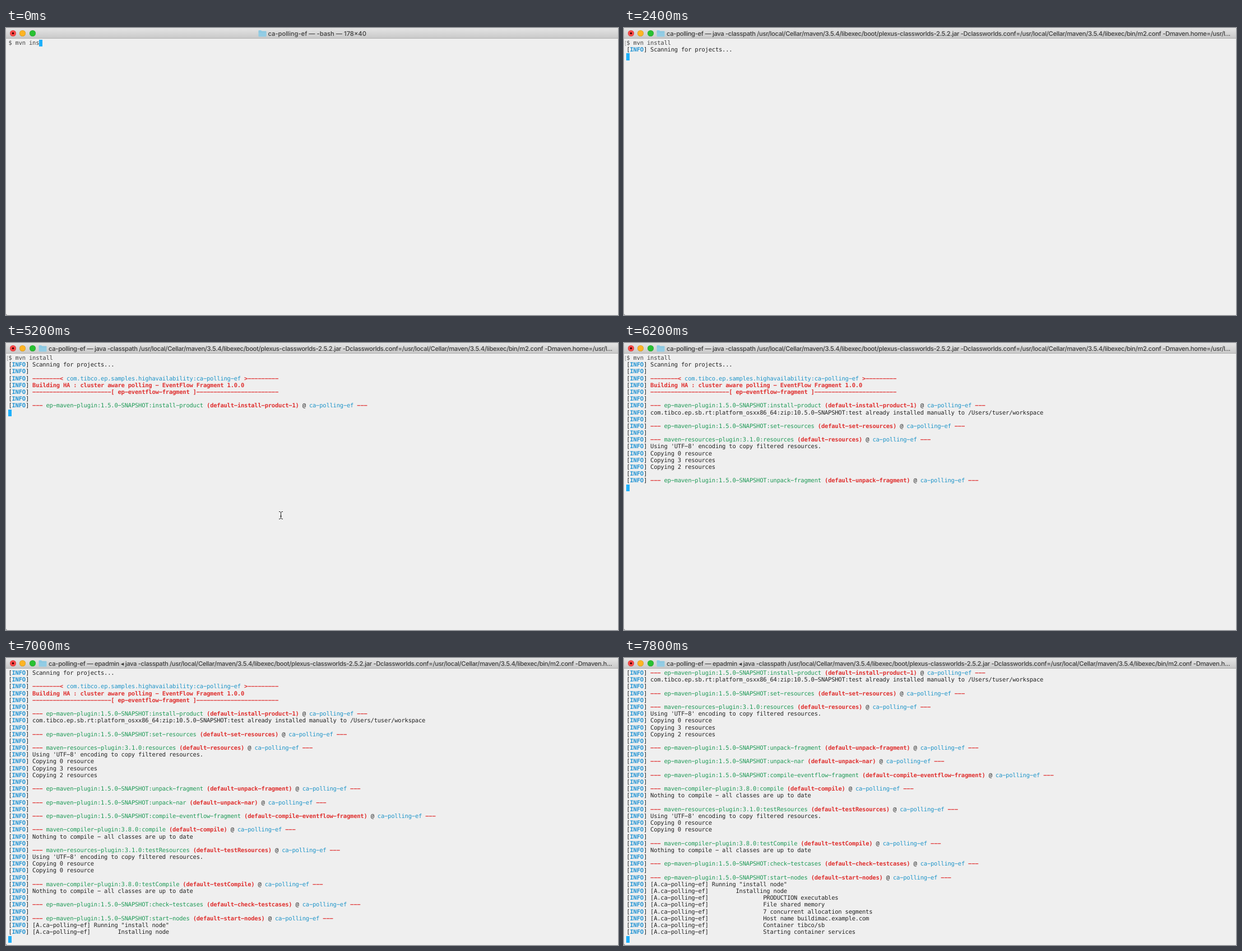
Animation, 1092 px wide and 513 px high, one loop 8000 ms. Source, as an HTML page:

```html
<!DOCTYPE html>
<html lang="en">
<head>
<meta charset="utf-8">
<title>Terminal</title>
<style>
  html, body { margin: 0; width: 100%; height: 100%; overflow: hidden; background: #777; }
  #window { position: relative; width: 1092px; height: 513px; overflow: hidden;
    background: #efefef; border-bottom-left-radius: 3px; text-rendering: geometricPrecision; }
  #bar { position: absolute; inset: 0 0 auto; height: 18px; border-bottom: 1px solid #b1b1b1;
    background: linear-gradient(#e4e4e4, #c9c9c9); }
  .light { position: absolute; top: 4px; width: 11px; height: 11px; border-radius: 50%;
    box-shadow: inset 0 0 0 .5px #0003; }
  #close { left: 6.5px; background: radial-gradient(circle, #4d0000 1.6px, #fc4948 2.2px); }
  #shrink { left: 24px; background: #fdb424; }
  #zoom { left: 41.5px; background: #28c132; }
  #title { position: absolute; top: 0; height: 19px; display: flex; align-items: center;
    white-space: pre; color: #3c3c3c; font: 500 11.2px Inter, sans-serif; }
  #title.tight { letter-spacing: -.32px; }
  #title svg { margin-right: 3px; }
  #screen { position: absolute; left: 4.4px; top: 21px; height: 488px; margin: 0; color: #222;
    font: 10.46px/12.2px "DejaVu Sans Mono", monospace; letter-spacing: calc(6.1px - .60205em); }
  #screen div { position: relative; height: 12.2px; }
  .command { color: #444; }
  .mark { position: absolute; left: -2.9px; top: 2px; width: 2px; height: 9px;
    border: solid #aaa; border-width: 1px 0 1px 1px; box-sizing: border-box; }
  .info { color: #2093d3; font-weight: bold; }
  .red { color: #df302f; font-weight: bold; }
  .green { color: #1f9a57; }
  .cyan { color: #1f95c9; }
  #cursor { position: absolute; width: 6.1px; height: 12.2px; background: #1db0fb; }
  #pointer { position: absolute; }
</style>
</head>
<body>
<div id="window">
  <div id="bar">
    <i class="light" id="close"></i><i class="light" id="shrink"></i><i class="light" id="zoom"></i>
    <div id="title"><svg width="15" height="13"><path d="M.5 2q0-1 1-1h3.5l1.5 1.5h7q1 0 1 1v8q0 1-1 1h-12q-1 0-1-1z" fill="#92cce4"/><path d="M.5 4h14" stroke="#7dbdd9" stroke-width=".7"/></svg><span id="titleText"></span></div>
  </div>
  <pre id="screen"></pre>
  <div id="cursor"></div>
  <svg id="pointer" width="7" height="14"><path d="M0 .5h2l1.5 1.5 1.5-1.5h2M3.5 2v10M0 13.5h2l1.5-1.5 1.5 1.5h2M2 8.5h3" fill="none" stroke="#222"/></svg>
</div>
<script>
const $ = id => document.getElementById(id);
const span = (type, text) => `<span class="${type}">${text}</span>`;
const red = text => span('red', text);
const cyan = text => span('cyan', text);
const info = (text = '') => `[${span('info', 'INFO')}] ${text}`;
const dashes = n => '-'.repeat(n);

// A blank line followed by the heading of a plugin goal
const goal = (plugin, name, id = name) => [info(), info(
  `${red('---')} ${span('green', `${plugin}:${name}`)} ${red(`(default-${id})`)} @ ${cyan('ca-polling-ef')} ${red('---')}`)];
const ep = (name, id) => goal('ep-maven-plugin:1.5.0-SNAPSHOT', name, id);
const resources = (name, ...counts) => [
  ...goal('maven-resources-plugin:3.1.0', name),
  info("Using 'UTF-8' encoding to copy filtered resources."),
  ...counts.map(n => info(`Copying ${n} resource${n ? 's' : ''}`))];
const compiler = name => [
  ...goal('maven-compiler-plugin:3.8.0', name),
  info('Nothing to compile - all classes are up to date')];
const node = (indent, text) => info('[A.ca-polling-ef] ' + ' '.repeat(indent) + text);

const command = '$ mvn install';
const lines = [
  span('mark', '') + span('command', command),
  info('Scanning for projects...'),
  info(),
  info(`${red(dashes(8) + '&lt;')} ${cyan('com.tibco.ep.samples.highavailability:ca-polling-ef')} ${red('&gt;' + dashes(9))}`),
  info(red('Building HA : cluster aware polling - EventFlow Fragment 1.0.0')),
  info(red(`${dashes(23)}[ ep-eventflow-fragment ]${dashes(24)}`)),
  ...ep('install-product', 'install-product-1'),
  info('com.tibco.ep.sb.rt:platform_osxx86_64:zip:10.5.0-SNAPSHOT:test already installed manually to /Users/tuser/workspace'),
  ...ep('set-resources'),
  ...resources('resources', 0, 3, 2),
  ...ep('unpack-fragment'),
  ...ep('unpack-nar'),
  ...ep('compile-eventflow-fragment'),
  ...compiler('compile'),
  ...resources('testResources', 0, 0),
  ...compiler('testCompile'),
  ...ep('check-testcases'),
  ...ep('start-nodes'),
  node(0, 'Running "install node"'),
  node(7, 'Installing node'),
  ...['PRODUCTION executables', 'File shared memory', '7 concurrent allocation segments',
    'Host name buildimac.example.com', 'Container tibco/sb', 'Starting container services']
    .map(text => node(15, text))
];

const cell = { w: 6.1, h: 12.2 }, rows = 40, loop = 8000, enter = 1400;
// [time, number of finished lines]
const output = [[0, 0], [enter, 1], [2400, 2], [3400, 6], [4000, 8], [6200, 19], [6400, 25],
  [6600, 38], [6800, 39], [7000, 40], [7600, 43], [7800, 46]];
const maven = '/usr/local/Cellar/maven/3.5.4/libexec';
const java = `java -classpath ${maven}/boot/plexus-classworlds-2.5.2.jar -Dclassworlds.conf=${maven}/bin/m2.conf -Dmaven.h`;
const titles = [[0, '-bash — 178×40'], [enter, java + 'ome=/usr/l...'], [7000, `epadmin ◂ ${java}...`]];
const pointers = [[0], [5200, 487, 301], [5400, 626, 200], [5600]];
const at = (steps, t) => steps.findLast(step => step[0] <= t);
// The terminal face has wide hyphens, as long as a minus sign
const widen = line => line.replaceAll('-', '−');

let shown;
function draw(t) {
  const count = at(output, t)[1];
  const typed = command.slice(0, 9 + Math.min(4, Math.floor(t / 200)));
  const [, x, y] = at(pointers, t);
  const key = [count, typed, x].join();
  if (key === shown) return;
  shown = key;

  const first = Math.max(0, count + 1 - rows);
  const visible = count ? lines.slice(first, count) : [span('command', typed)];
  $('screen').innerHTML = visible.map(line => `<div>${widen(line)}</div>`).join('');
  $('cursor').style.left = 4.4 + (count ? 0 : typed.length * cell.w) + 'px';
  $('cursor').style.top = 21 + (count - first) * cell.h + 'px';

  $('titleText').textContent = 'ca-polling-ef — ' + at(titles, t)[1];
  $('title').className = count ? 'tight' : '';
  $('title').style.left = (count ? 58 : 449.5) + 'px';

  $('pointer').style.display = x ? 'block' : 'none';
  $('pointer').style.left = x + 'px';
  $('pointer').style.top = y + 'px';
}

function frame() {
  draw(performance.now() % loop);
  requestAnimationFrame(frame);
}
frame();
</script>
</body>
</html>
```
